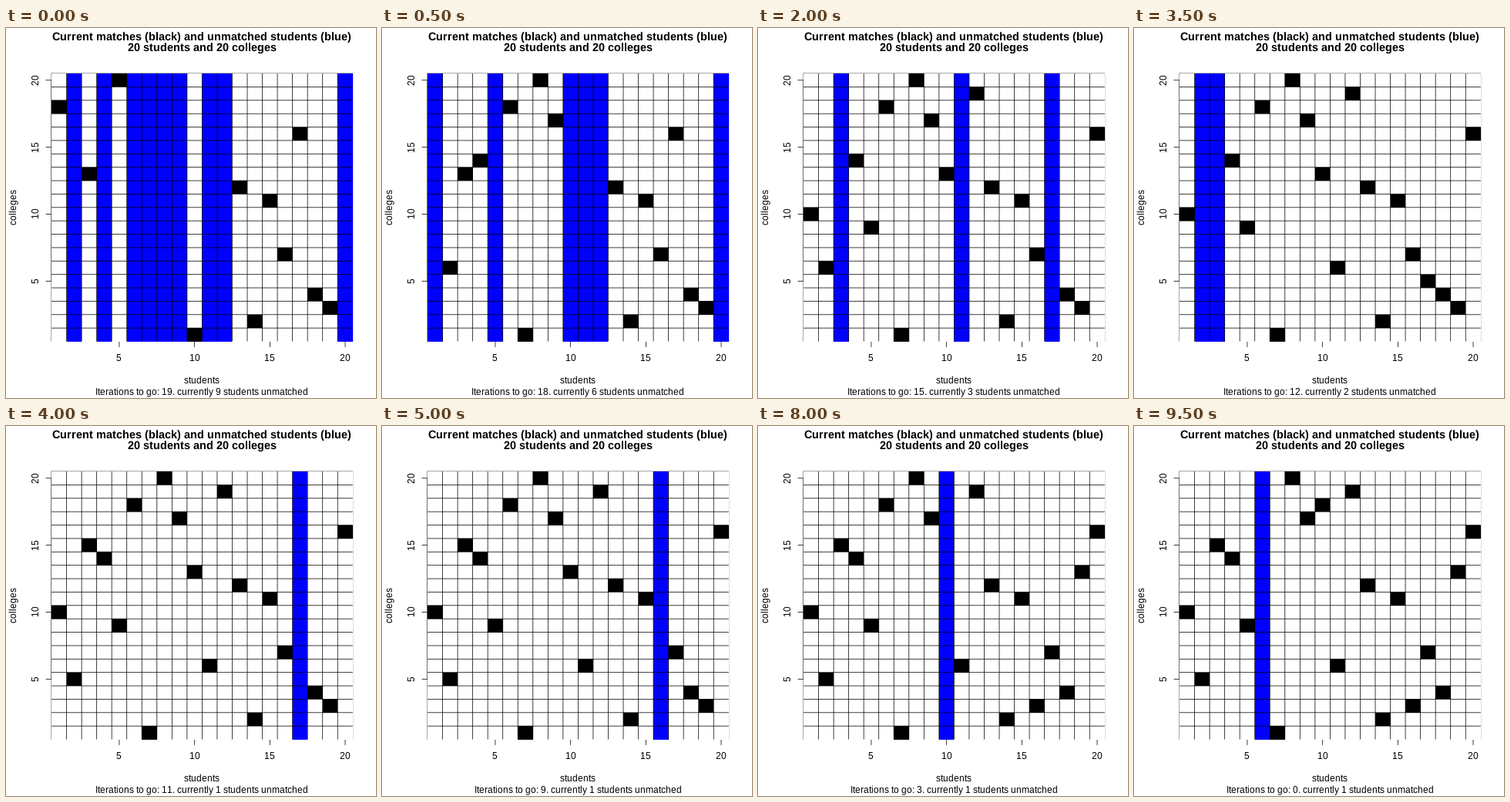
Recreate the animation shown at these times as a matplotlib script. Size 480x480 px, loop 10 s.

```python
import numpy as np
import matplotlib.pyplot as plt
from matplotlib.animation import FuncAnimation
from matplotlib.patches import PathPatch, Rectangle
from matplotlib.path import Path
from matplotlib.textpath import TextPath
from matplotlib.transforms import Affine2D

SIZE = 480
N = 20
STEPS = 20
LINE = 14.4  # height of one margin line in pixels
LEFT, RIGHT = 4.1 * LINE, SIZE - 2.1 * LINE
TOP, BOTTOM = 4.1 * LINE, SIZE - 5.1 * LINE
MID_X, MID_Y = (LEFT + RIGHT) / 2, (TOP + BOTTOM) / 2
TICKS = (5, 10, 15, 20)

# College held by each student at the start, 0 for none.
START = [18, 0, 13, 0, 20, 0, 0, 0, 0, 1, 0, 0, 12, 2, 11, 7, 16, 4, 3, 0]
# Accepted proposals per step: {student: college}.
ACCEPTED = {
    1: {2: 6, 4: 14, 6: 18, 7: 1, 8: 20, 9: 17},
    2: {1: 10, 12: 19},
    3: {10: 13},
    4: {5: 9, 20: 16},
    5: {11: 6},
    7: {17: 5},
    8: {2: 5, 3: 15},
    10: {17: 7},
    12: {16: 3},
    16: {19: 13},
    19: {10: 18},
}

fig = plt.figure(figsize=(SIZE / 72, SIZE / 72), dpi=72, facecolor="white")
ax = fig.add_axes([0, 0, 1, 1])
ax.set_xlim(0, SIZE)
ax.set_ylim(SIZE, 0)
ax.axis("off")


def px(student):
    return LEFT + (student - 0.5) * (RIGHT - LEFT) / N


def py(college):
    return BOTTOM - (college - 0.5) * (BOTTOM - TOP) / N


def glyphs(text, size, weight):
    return TextPath((0, 0), text, size=size,
                    prop={"family": "Liberation Sans", "weight": weight})


advances = {}


def advance(char, size, weight):
    """Glyph advance rounded to whole pixels."""
    key = char, size, weight
    if key not in advances:
        wide = glyphs(f"|{char}|", size, weight).get_extents().width
        bare = glyphs("||", size, weight).get_extents().width
        advances[key] = round(wide - bare)
    return advances[key]


def text_path(text, x, y, size=12, weight="normal", vertical=False):
    """Outline of text centred on (x, y), y being its baseline (x if vertical)."""
    x_height = glyphs("o", size, weight).get_extents().y1
    fit = np.floor(x_height + 0.625) / x_height  # x-height on the pixel grid
    pen, parts = 0, []
    for char in text:
        if char != " ":
            glyph = glyphs(char, size, weight)
            parts.append(Path(glyph.vertices * [1, fit] + [pen, 0], glyph.codes))
        pen += advance(char, size, weight)
    if vertical:
        place = Affine2D.from_values(0, -1, -1, 0, round(x), round(y + pen / 2))
    else:
        place = Affine2D.from_values(1, 0, 0, -1, round(x - pen / 2), round(y))
    return place.transform_path(Path.make_compound_path(*parts))


def label(*args, **kwargs):
    patch = PathPatch(text_path(*args, **kwargs), fc="black", lw=0, snap=False, zorder=4)
    return ax.add_patch(patch)


def line(xs, ys, zorder, cap="round"):
    ax.plot(xs, ys, color="black", lw=0.75, snap=False, zorder=zorder,
            solid_capstyle=cap)


def pixel_box(x0, y0, x1, y1):
    x0, y0, x1, y1 = (round(v) for v in (x0, y0, x1, y1))
    return x0, y0, x1 - x0, y1 - y0


def add_box(color, zorder):
    return ax.add_patch(Rectangle((0, 0), 1, 1, fc=color, lw=0, zorder=zorder))


# Frame and axes, partly covered by the field.
line([LEFT, RIGHT, RIGHT, LEFT, LEFT], [TOP, TOP, BOTTOM, BOTTOM, TOP], 0)
line([px(5), px(20)], [BOTTOM, BOTTOM], 0)
line([LEFT, LEFT], [py(5), py(20)], 0)
for value in TICKS:
    line([px(value)] * 2, [BOTTOM, BOTTOM + LINE / 2], 0)
    line([LEFT, LEFT - LINE / 2], [py(value)] * 2, 0)
    label(str(value), px(value), BOTTOM + 1.8 * LINE)
    label(str(value), LEFT - 1.2 * LINE, py(value), vertical=True)

add_box("white", 1).set_bounds(*pixel_box(LEFT, TOP, RIGHT, BOTTOM))
cells = [add_box("white", 2) for _ in range(N)]
for k in range(1, N):
    line([px(k + 0.5)] * 2, [TOP, BOTTOM], 3, "butt")
    line([LEFT, RIGHT], [py(k + 0.5)] * 2, 3, "butt")

label("Current matches (black) and unmatched students (blue)", MID_X, 16, 14.4, "bold")
label("20 students and 20 colleges", MID_X, 30, 14.4, "bold")
label("students", MID_X, BOTTOM + 3.8 * LINE)
label("colleges", LEFT - 3.2 * LINE, MID_Y, vertical=True)
status = label("Iterations", MID_X, BOTTOM + 4.8 * LINE)


def matches_at(step):
    held = list(START)
    for s in range(1, step + 1):
        for student, college in ACCEPTED.get(s, {}).items():
            if college in held:
                held[held.index(college)] = 0
            held[student - 1] = college
    return held


def draw(step):
    held = matches_at(step)
    for student, (cell, college) in enumerate(zip(cells, held), 1):
        top, bottom = (py(college + 0.5), py(college - 0.5)) if college else (TOP, BOTTOM)
        cell.set_bounds(*pixel_box(px(student - 0.5), top, px(student + 0.5), bottom))
        cell.set_facecolor("black" if college else "blue")
    text = (f"Iterations to go: {STEPS - 1 - step}. "
            f"currently {held.count(0)} students unmatched")
    status.set_path(text_path(text, MID_X, BOTTOM + 4.8 * LINE))
    return [*cells, status]


anim = FuncAnimation(fig, draw, frames=STEPS, interval=500,
                     init_func=lambda: draw(0), repeat=True, repeat_delay=0)
plt.show()
```
